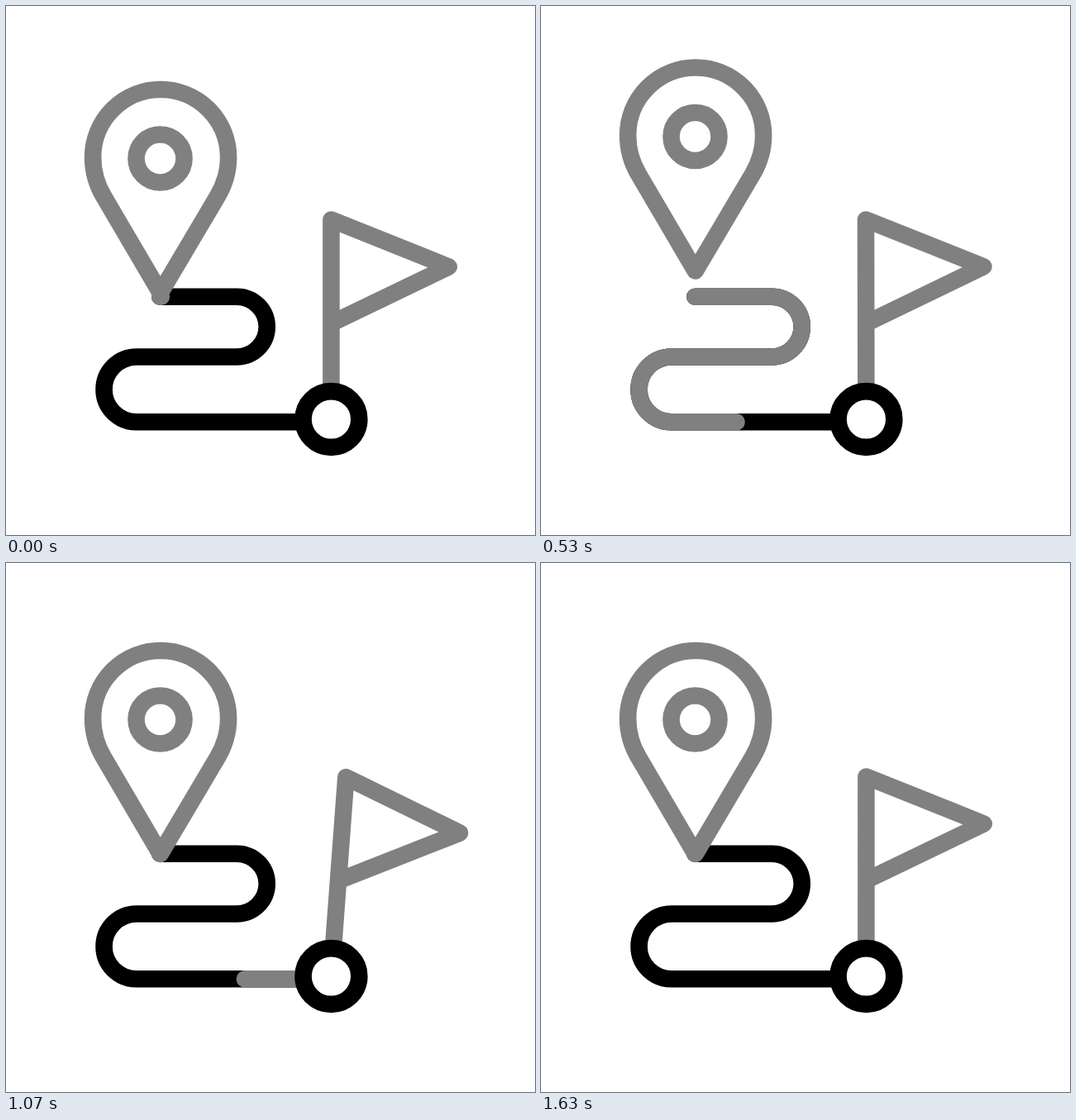
An HTML page for the animation above (1.67 s loop, 640x640 px).

```html
<!DOCTYPE html>
<html lang="en">
<head>
<meta charset="utf-8">
<title>Route</title>
<style>
  html, body { margin: 0; height: 100%; overflow: hidden; background: #fff; }
  svg { display: block; width: 100vw; height: 100vh; }
  svg * { fill: none; stroke-width: 20.6; stroke-linecap: round; stroke-linejoin: round; }
  .gray { stroke: #808080; }
  .black { stroke: #000; }
</style>
</head>
<body>
<svg viewBox="0 0 640 640">
  <defs>
    <path id="route" pathLength="1" d="M186.3 351.7H279.3A36.4 36.4 0 0 1 279.3 424.5H157.9A39.4 39.4 0 0 0 157.9 503.3H354"/>
  </defs>
  <use href="#route" class="black"/>
  <path id="trail" class="gray" pathLength="1"/>
  <g id="pin" class="gray">
    <path d="M186.7 352L118 235C110 221.500 105.100 205 105.100 188A82 82 0 0 1 269.100 188C269.100 205 264 221.500 256 235Z"/>
    <circle cx="186.500" cy="189.500" r="29"/>
  </g>
  <path id="flag" class="gray" d="M393.400 466V258.500L535.700 315.500L393.400 384"/>
  <circle class="black" cx="393.400" cy="500" r="33.900"/>
</svg>
<script>
const LOOP = 1670, FRAMES = 50;
const byId = id => document.getElementById(id);
const trail = byId('trail'), pin = byId('pin'), flag = byId('flag');
trail.setAttribute('d', byId('route').getAttribute('d'));

// Bezier easing with handles (a, 0) and (b, 1)
const ease = (a, b) => x => {
  let low = 0, high = 1;
  for (let i = 0; i < 24; i++) {
    const s = (low + high) / 2, r = 1 - s;
    if (3 * a * s * r * r + 3 * b * s * s * r + s ** 3 < x) low = s;
    else high = s;
  }
  return low * low * (3 - 2 * low);
};
const smooth = ease(1 / 3, 2 / 3), brisk = ease(1 / 6, 5 / 6), strong = ease(.48, .5);

// Value at a frame, from [frame, value, easing into it] keys
function track(keys, frame) {
  for (let i = 1; i < keys.length; i++) {
    const [from, start] = keys[i - 1], [to, end, easing] = keys[i];
    if (frame <= from) return start;
    if (frame < to) return start + (end - start) * easing((frame - from) / (to - from));
  }
  return keys.at(-1)[1];
}

const lift = [[0, 0], [8, -63, brisk], [26, 0, smooth]];
const head = [[0, 0], [25, 1, strong]];
const tail = [[18.9, 0], [37.6, 1, strong]];
const sway = [[16.5, 0], [23.25, -6.6, smooth], [30, 12.3, smooth],
              [36.75, -7, smooth], [43.5, 3.6, smooth], [50, 0, smooth]];

function draw(now) {
  const time = now % LOOP;
  const frame = Math.min(FRAMES, Math.floor((time + 5) * .03) + 1);
  const start = track(tail, frame), length = track(head, frame) - start;
  trail.style.display = length > 0 ? '' : 'none';
  trail.setAttribute('stroke-dasharray', `${length} 2`);
  trail.setAttribute('stroke-dashoffset', -start);
  pin.setAttribute('transform', `translate(0 ${track(lift, frame)})`);
  flag.setAttribute('transform', `rotate(${track(sway, frame)} 393.400 500)`);
}

const origin = performance.now();
function tick() {
  draw(performance.now() - origin);
  requestAnimationFrame(tick);
}
tick();
</script>
</body>
</html>
```
